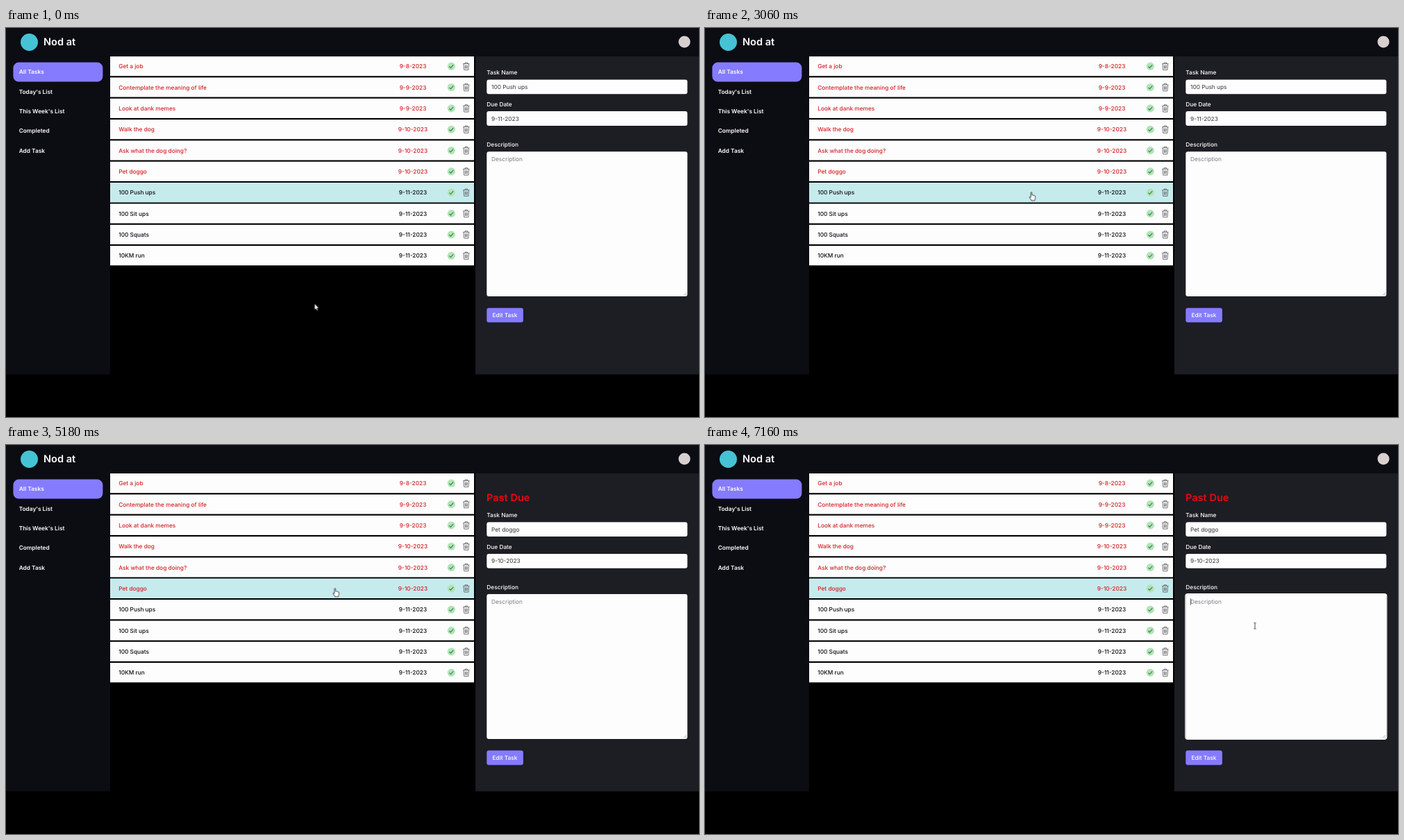
Write an HTML page that moves like this. It is 998 px wide and 561 px high and loops after 8 s.

```html
<!DOCTYPE html>
<html lang="en">
<head>
<meta charset="utf-8">
<title>Task list</title>
<style>
html, body { margin: 0; width: 100%; height: 100%; overflow: hidden; background: #000; }
svg { display: block; width: 100vw; height: 100vh; }
text { font: 500 8.32px Inter, sans-serif; fill: #fff; white-space: pre; text-rendering: geometricPrecision; }
.brand { font-size: 14.55px; font-weight: 600; }
.nav { font-weight: 600; }
.date { text-anchor: middle; }
.task { fill: #0c0c10; }
.late { fill: #d32024; }
.value { font-weight: 400; fill: #35353a; }
.hint { font-weight: 400; fill: #7d7d82; }
.due { font-size: 14.55px; font-weight: 600; fill: #ec0712; }
.field { fill: #fdfdfe; }
.accent { fill: #857bfe; }

.before, .after, .focus, .arrow, .hand, .beam { animation: 8s step-end infinite; }
.before { animation-name: before; }
.after { animation-name: after; }
.focus { animation-name: focus; }
.arrow { animation-name: arrow; }
.hand { animation-name: hand; }
.beam { animation-name: beam; }
@keyframes before { 0% { opacity: 1 } 64.75%, 100% { opacity: 0 } }
@keyframes after { 0% { opacity: 0 } 64.75%, 100% { opacity: 1 } }
@keyframes focus { 0% { opacity: 0 } 89.25%, 100% { opacity: 1 } }
@keyframes arrow { 0% { opacity: 1 } 30% { opacity: 0 } 71.5% { opacity: 1 } 72.1%, 100% { opacity: 0 } }
@keyframes hand { 0% { opacity: 0 } 30% { opacity: 1 } 71.5%, 100% { opacity: 0 } }
@keyframes beam { 0% { opacity: 0 } 72.1%, 100% { opacity: 1 } }

.pointer { animation: move 8s linear infinite; }
@keyframes move {
  0%, 25.75% { transform: translate(444.5px, 397.6px) }
  26.25% { transform: translate(443.6px, 396px); animation-timing-function: ease-in-out }
  35.25%, 36.5% { transform: translate(463.5px, 244px) }
  38.25% { transform: translate(470px, 236.8px); animation-timing-function: ease-out }
  45.75%, 47% { transform: translate(473.5px, 219px); animation-timing-function: ease-in-out }
  51%, 64.75% { transform: translate(473.8px, 206.7px); animation-timing-function: ease-in }
  70% { transform: translate(577.6px, 226.3px); animation-timing-function: cubic-bezier(.25, .25, .5, 1) }
  73.75%, 75% { transform: translate(751px, 254px); animation-timing-function: ease-out }
  77%, 79% { transform: translate(791.4px, 260.3px) }
  80.25%, 100% { transform: translate(792px, 260.8px) }
}
</style>
</head>
<body>
<svg viewBox="0 0 998 561" preserveAspectRatio="none">
  <defs>
    <g id="icons">
      <circle cx="641.3" r="5.6" fill="#b5e3b9"/>
      <path d="M638.4 .3l2 2 3.8-4.3" fill="none" stroke="#3c8f49" stroke-width="1.3"/>
      <path d="M658.2-3.6h9.2M661-3.7v-1.5h3.6v1.5M659-3.4l.7 8.6h6.2l.7-8.6M661.2-1.6l.3 5M662.8-1.6v5M664.4-1.6l-.3 5"
        fill="none" stroke="#55555a" stroke-width=".8"/>
    </g>
  </defs>
  <path d="M0 0H998V41H150V499.600H0z" fill="#0c0c13"/>
  <path d="M676 41H998V499.600H676z" fill="#1d1d24"/>
  <circle cx="33.5" cy="20.5" r="12.5" fill="#45c3d4"/>
  <text class="brand" x="54" y="24.9">Nod at</text>
  <circle cx="977" cy="20" r="8.5" fill="#d8d0cf"/>
  <rect class="accent" x="10.400" y="49.600" width="129" height="28" rx="8"/>
  <g id="nav"></g>
  <g id="rows"></g>
  <g id="forms"></g>
  <g class="pointer">
    <path class="arrow" d="M0 0V8.800L2 7 3.400 10.100 4.800 9.500 3.400 6.500H6z" fill="#fff" stroke="#000" stroke-width=".5"/>
    <path class="hand" d="M-.9 .7C-.9-.4 .8-.4 .8 .7V4.400C1.200 3.700 2.400 3.900 2.500 4.700 3 4.200 4.100 4.400 4.200 5.200 4.900 4.900 5.700 5.300 5.700 6.100V8.400C5.700 9.600 4.900 10.300 4.800 12H-.1C-.3 10.700-1.700 9.500-2.700 7.800-3.300 6.700-2.200 6.100-1.500 6.900L-.9 7.600z"
      fill="#fff" stroke="#111" stroke-width=".75"/>
    <path class="beam" d="M-1.700-4.200H-.5L0-3.800 .5-4.200H1.700M0-3.800V3.800M-1.700 4.200H-.5L0 3.800 .5 4.200H1.700"
      fill="none" stroke="#222" stroke-width=".8"/>
  </g>
</svg>
<script>
const fill = (id, html) => { document.getElementById(id).innerHTML = html; };
const text = (cls, x, mid, str) => `<text class="${cls}" x="${x}" y="${mid + 3}">${str}</text>`;
const box = (cls, x, y, w, h, r = 0) =>
  `<rect class="${cls}" x="${x}" y="${y}" width="${w}" height="${h}" rx="${r}"/>`;

const nav = ["All Tasks", "Today's List", "This Week's List", "Completed", "Add Task"];
fill("nav", nav.map((s, i) => text("nav", 18.7, 63.4 + 28.32 * i, s)).join(""));

const tasks = [
  ["Get a job", 8], ["Contemplate the meaning of life", 9], ["Look at dank memes", 9],
  ["Walk the dog", 10], ["Ask what the dog doing?", 10], ["Pet doggo", 10],
  ["100 Push ups", 11], ["100 Sit ups", 11], ["100 Squats", 11], ["10KM run", 11]
];
const picked = { 5: "after", 6: "before" };

fill("rows", tasks.map(([name, day], i) => {
  const y = 41 + 30.35 * i, mid = y + 14.2;
  const cls = day < 11 ? "late" : "task";
  const tint = picked[i]
    ? `<g class="${picked[i]}" fill="#c6ebed">${box("", 150, y, 524, 28.2)}</g>` : "";
  return box("field", 150, y, 524, 28.2) + tint +
    text(cls, 162.2, mid, name) + text(cls + " date", 586, mid, `9-${day}-2023`) +
    `<use href="#icons" y="${mid}"/>`;
}).join(""));

const form = (state, dy, name, date, extra = "") => `<g class="${state}">${extra}
  <g transform="translate(0 ${dy})">
    ${text("", 692.3, 64, "Task Name")}
    ${box("field", 692.3, 74.4, 289, 20.8, 3)}
    ${text("value", 699, 85, name)}
    ${text("", 692.3, 109.8, "Due Date")}
    ${box("field", 692.3, 120.1, 289, 20.8, 3)}
    ${text("value", 699, 130.6, date)}
    ${text("", 692.3, 168, "Description")}
    ${box("field", 692.3, 178.2, 289, 208.8, 3)}
    ${text("hint", 699, 189.2, "Description")}
    <path d="M976 385.500l4-4M978.500 385.500l1.700-1.700" stroke="#77777c" stroke-width=".6"/>
    ${box("accent", 692.3, 403.7, 52.6, 20.8, 3)}
    ${text("", 700.5, 414.1, "Edit Task")}
  </g></g>`;

fill("forms",
  form("before", 0, "100 Push ups", "9-11-2023") +
  form("after", 36.9, "Pet doggo", "9-10-2023", '<text class="due" x="692" y="81.200">Past Due</text>') +
  `<g class="focus">
    <rect x="691.800" y="214.600" width="290" height="209.800" rx="3.500" fill="none" stroke="#fff" stroke-width="1.100"/>
    <path d="M699.400 221V231" stroke="#222" stroke-width=".7"/>
  </g>`);
</script>
</body>
</html>
```
